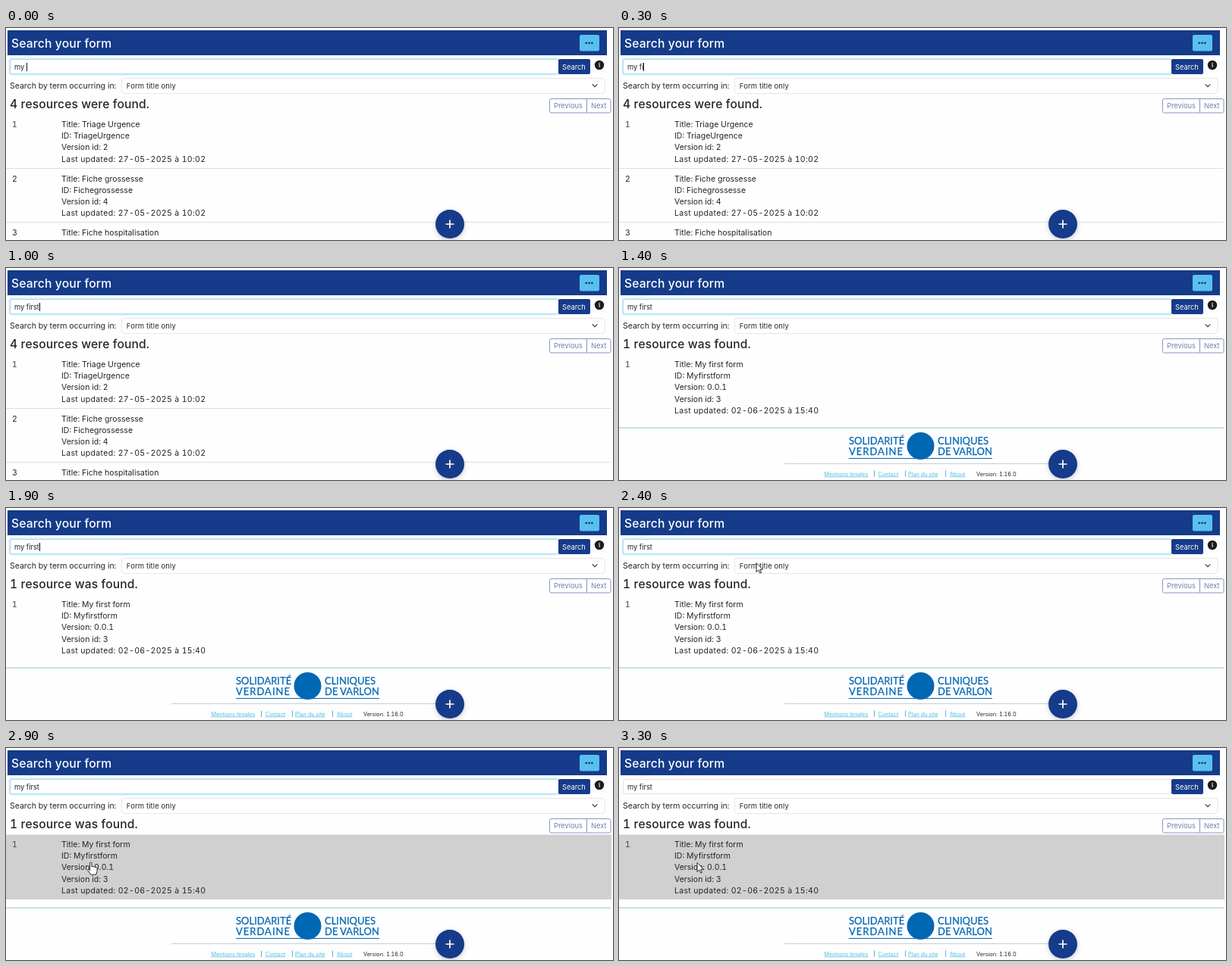
These frames come from a looping animation (800x280 px, 3400 ms). An HTML page:

```html
<!DOCTYPE html>
<html lang="en">
<head>
<meta charset="utf-8">
<title>Search your form</title>
<style>
  html, body { margin: 0; width: 100%; height: 100%; overflow: hidden; background: #fefefe; }
  svg { display: block; width: 100%; height: 100%; }
  text { font: 10.5px Inter, "Open Sans", sans-serif; font-variant-numeric: tabular-nums; fill: #212529; white-space: pre; }
  .title { font-size: 15.7px; font-weight: 500; letter-spacing: .14px; fill: #fff; }
  .count { font-size: 15.6px; font-weight: 500; letter-spacing: .12px; }
  .small { font-size: 9.3px; }
  .option { font-size: 9.5px; letter-spacing: .12px; }
  .white { fill: #fff; }
  .page { font-size: 9.3px; fill: #6f80b3; }
  .index { fill: #27504c; }
  .updated { letter-spacing: .33px; }
  .foot { font-size: 7.3px; }
  .link { font-size: 7.25px; fill: #52bde8; text-decoration: underline; }
  .brand { font: 13px Lato, "Open Sans", sans-serif; fill: #0068b3; stroke: #0068b3; stroke-width: .25px; }
  .spaced { letter-spacing: 1px; }
  .fab { filter: drop-shadow(0 2px 3px rgba(0, 0, 0, .2)); }
</style>
</head>
<body>
<svg id="stage" viewBox="0 0 800 280"></svg>
<script>
const LOOP = 3400, FRAME = 100;
const NAVY = '#153b8a', BLUE = '#0068b3';
const RESULTS_AT = 1400, POINTER_AT = 2400, HOVER_AT = 2500, CLICK_AT = 3000;
const QUERY = 'my first';
const KEY_TIMES = [100, 300, 400, 600, 800];   // keys typed after "my "
const LAST_KEY = KEY_TIMES[KEY_TIMES.length - 1];
const BLINK = 530;

const text = (x, y, value, cls = '') => `<text x="${x}" y="${y}" class="${cls}">${value}</text>`;
const rect = (x, y, w, h, attrs) => `<rect x="${x}" y="${y}" width="${w}" height="${h}" ${attrs}/>`;
const path = (d, attrs) => `<path d="${d}" fill="none" ${attrs}/>`;
const rule = (x1, x2, y, color) => path(`M${x1} ${y}H${x2}`, `stroke="${color}"`);

function entry(number, y, lines, updated) {
  const rows = lines.map((line, i) => text(73, y + i * 15.2, line));
  if (updated) rows.push(text(73, y + lines.length * 15.2, `Last updated: ${updated}`, 'updated'));
  return text(8, y, number, number === 1 ? 'index' : '') + rows.join('');
}

const header =
  rect(2, 3, 790, 33, `fill="${NAVY}"`) +
  text(7, 25.5, 'Search your form', 'title') +
  rect(756, 9, 26, 21.5, 'rx="2" fill="#58c0ef"') +
  [764.8, 768.6, 772.4].map(x => `<circle cx="${x}" cy="19.8" r="1.35" fill="#17365f"/>`).join('');

const searchBar =
  rect(3.5, 39.5, 726, 23, 'id="ring" rx="4" fill="#d3eefa"') +
  rect(5.5, 41.5, 723, 19, 'id="field" rx="2.5" fill="#fff"') +
  text(11, 54.5, '', 'small').replace('<text', '<text id="query"') +
  rect(0, 46, 1, 11, 'id="caret" fill="#111"') +
  rect(728, 41, 42, 20, `rx="2" fill="${NAVY}"`) +
  text(733, 54.5, 'Search', 'small white') +
  '<circle cx="782" cy="49" r="6.2" fill="#1b1c1e"/>' +
  path('M781.2 48.3H782.2V51.8', 'stroke="#fff" stroke-width="1"') +
  '<circle cx="782.1" cy="46.4" r=".75" fill="#fff"/>';

const filters =
  text(5, 80, 'Search by term occurring in:') +
  rect(152.5, 66.5, 636.5, 20, 'rx="3" fill="#fff" stroke="#e3e6e9"') +
  text(158.8, 79.5, 'Form title only', 'option') +
  path('M773 74.6L776 77.6L779 74.6', 'stroke="#343a40" stroke-width="1.15" stroke-linecap="round"');

const pager =
  rect(716.5, 93.5, 80.5, 18.5, 'rx="2.5" fill="#fff" stroke="#8497c3"') +
  path('M765.5 93.5V112', 'stroke="#8497c3"') +
  text(722, 106, 'Previous', 'page') + text(771, 106, 'Next', 'page');

const allForms =
  text(5, 106.3, '4 resources were found.', 'count') +
  entry(1, 131, ['Title: Triage Urgence', 'ID: TriageUrgence', 'Version id: 2'], '27-05-2025 à 10:02') +
  rule(0, 797, 185.5, '#dcdfe3') +
  entry(2, 202.5, ['Title: Fiche grossesse', 'ID: Fichegrossesse', 'Version id: 4'], '27-05-2025 à 10:02') +
  rule(0, 797, 256.5, '#dcdfe3') +
  entry(3, 274, ['Title: Fiche hospitalisation']);

const footer =
  rule(0, 797, 211, '#94bdcd') +
  text(303, 233, 'SOLIDARITÉ', 'brand') + text(303, 247, 'VERDAINE', 'brand spaced') +
  text(420, 233, 'CLINIQUES', 'brand') + text(420, 247, 'DE VARLON', 'brand') +
  rule(303, 492, 251.5, BLUE) +
  `<circle cx="397.5" cy="235" r="18" fill="${BLUE}"/>` +
  rule(218, 575, 258.5, '#c9cccf') +
  [[270.5, 'Mentions légales'], [341.5, 'Contact'], [381, 'Plan du site'], [436, 'About']]
    .map(([x, label]) => text(x, 274.5, label, 'link')).join('') +
  [336.5, 377.5, 430.5].map(x => path(`M${x} 267.5V276`, 'stroke="#5fb4d8"')).join('') +
  text(471, 274.5, 'Version: 1.16.0', 'foot');

const oneForm =
  rect(0, 114.5, 798, 85.5, 'id="hover" fill="#d0d0d0"') +
  text(5, 106.3, '1 resource was found.', 'count') +
  entry(1, 131, ['Title: My first form', 'ID: Myfirstform', 'Version: 0.0.1', 'Version id: 3'], '02-06-2025 à 15:40') +
  footer;

const addButton =
  `<circle class="fab" cx="585" cy="259" r="19" fill="${NAVY}"/>` +
  path('M579.5 259H590.5M585 253.5V264.5', 'stroke="#fff" stroke-width="1.7"');

// Both pointers have their hot spot at 0,0.
const pointers =
  '<g id="pointer" fill="#fff" stroke="#111" stroke-width=".9" stroke-linejoin="round">' +
  '<path id="arrow" d="M0 0V12L2.8 9.4L4.8 13.6L6.6 12.8L4.7 8.7H8.5Z"/>' +
  '<path id="hand" d="M-1.2 1Q0 -.6 1.2 1V6Q2.6 5 3.6 6.4Q5 5.5 6 7Q7.6 6.2 8.4 8V11.5L7 16.5H0L-4 10.8Q-4 8.8 -2.6 9.4L-1.2 10.8Z"/></g>';

document.getElementById('stage').innerHTML =
  header + searchBar + filters + pager +
  `<g id="before">${allForms}</g><g id="after">${oneForm}</g>` + addButton + pointers;

const el = Object.fromEntries([...document.querySelectorAll('[id]')].map(node => [node.id, node]));
const toggle = (node, on) => { node.style.display = on ? '' : 'none'; };

function pointerAt(t) {
  if (t < HOVER_AT) return [181, 72.5];
  const p = Math.min(1, (t - HOVER_AT) / (CLICK_AT - HOVER_AT));
  const e = p * p * (3 - 2 * p);
  return [187 - 84 * e, 144 + 7.5 * e];
}

function draw(t) {
  const typed = KEY_TIMES.filter(at => t >= at).length;
  const focused = t < CLICK_AT;
  const caretOn = focused && (t < LAST_KEY || Math.floor((t - LAST_KEY) / BLINK) % 2 === 0);

  el.query.textContent = QUERY.slice(0, 3 + typed);
  el.caret.setAttribute('x', Math.round(11 + el.query.getComputedTextLength()));
  toggle(el.caret, caretOn);
  toggle(el.ring, focused);
  el.field.setAttribute('stroke', focused ? '#a6dcf3' : '#dee2e6');

  toggle(el.before, t < RESULTS_AT);
  toggle(el.after, t >= RESULTS_AT);
  toggle(el.hover, t >= HOVER_AT);

  const onHand = t >= HOVER_AT && t < CLICK_AT;
  toggle(el.pointer, t >= POINTER_AT);
  toggle(el.hand, onHand);
  toggle(el.arrow, !onHand);
  el.pointer.setAttribute('transform', `translate(${pointerAt(t)})`);
}

const start = performance.now();
function tick() {
  const t = (performance.now() - start) % LOOP;
  draw(Math.floor(t / FRAME) * FRAME);
  requestAnimationFrame(tick);
}
tick();
</script>
</body>
</html>
```
